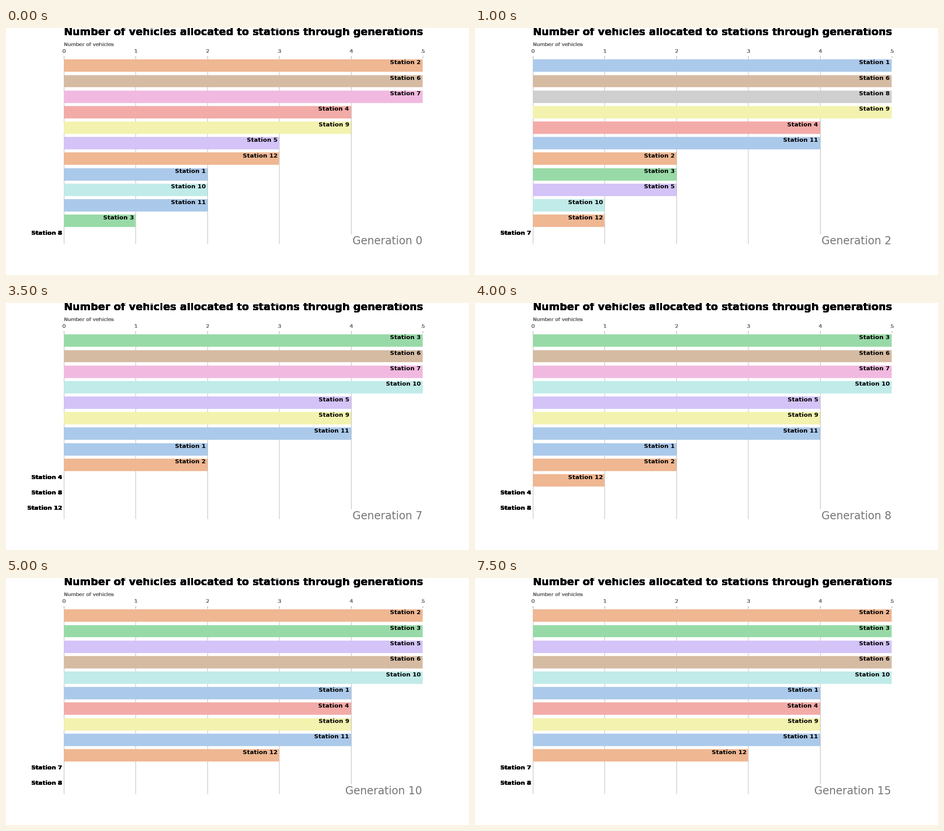
These frames come from a looping animation (1025x547 px, 8 s). A matplotlib script:

```python
import matplotlib.pyplot as plt
from matplotlib.animation import FuncAnimation
from matplotlib.patches import Rectangle

W, H, DPI = 1025, 547, 64
# layout units: a 1080 x 576 sheet scaled to the stage
SHEET_W, SHEET_H = 1080, 576
PT = W / SHEET_W * 72 / DPI

LEFT, UNIT = 0.125 * SHEET_W, 0.155 * SHEET_W
TOP, ROW = 69.73, 36.18
BOTTOM = TOP + 12 * ROW
GREY = "#777777"
HEAVY = 20  # text outside the plot area is overprinted

PASTEL = ["#A1C9F4", "#FFB482", "#8DE5A1", "#FF9F9B", "#D0BBFF",
          "#DEBB9B", "#FAB0E4", "#CFCFCF", "#FFFEA3", "#B9F2F0"]

# generation -> {vehicles: stations that change to that many}
MOVES = {
    0: {5: (2, 6, 7), 4: (4, 9), 3: (5, 12), 2: (1, 10, 11), 1: (3,)},
    1: {5: (1, 9), 4: (11,), 2: (3, 5), 1: (12,), 0: (7, 10)},
    2: {5: (8,), 2: (2,), 1: (10,)},
    7: {5: (3, 7, 10), 4: (5, 9), 2: (1,), 0: (4, 8, 12)},
    8: {1: (12,)},
    9: {5: (2,), 4: (1, 4), 3: (5,), 1: (10,), 0: (7,)},
    10: {5: (5, 10), 3: (12,)},
}


def allocation(gen):
    counts = dict.fromkeys(range(1, 13), 0)
    for step in range(gen + 1):
        for vehicles, stations in MOVES.get(step, {}).items():
            counts.update(dict.fromkeys(stations, vehicles))
    return counts


def muted(color, keep=0.75):
    rgb = [int(color[i:i + 2], 16) / 255 for i in (1, 3, 5)]
    mid = (max(rgb) + min(rgb)) / 2
    return [mid + (c - mid) * keep for c in rgb]


COLORS = [muted(c) for c in PASTEL]

plt.rcParams["font.family"] = "DejaVu Sans"
fig = plt.figure(figsize=(W / DPI, H / DPI), dpi=DPI, facecolor="white")
ax = fig.add_axes([0, 0, 1, 1])
ax.set_xlim(0, SHEET_W)
ax.set_ylim(SHEET_H, 0)
ax.axis("off")


def write(x, y, text, size, times=1, **style):
    return [ax.text(x, y, text, fontsize=size * PT, va="baseline",
                    zorder=5, **style) for _ in range(times)]


def vline(x, y0, y1, color):
    x = round(x) + 0.5
    ax.plot([x, x], [y0, y1], color=color, lw=PT, snap=False,
            solid_capstyle="butt", zorder=1)


def box(x0, y0, x1, y1, color, zorder):
    x0, y0, x1, y1 = map(round, (x0, y0, x1, y1))
    return ax.add_patch(Rectangle((x0, y0), x1 - x0, y1 - y0, lw=0,
                                  facecolor=color, snap=False, zorder=zorder))


write(LEFT, 16.9, "Number of vehicles allocated to stations through generations",
      24.1, HEAVY, weight="bold")
write(LEFT, 42.5, "Number of vehicles", 12, HEAVY, color=GREY)
for k in range(6):
    x = LEFT + k * UNIT
    write(x, 58.3, str(k), 12, HEAVY, color=GREY, ha="center")
    vline(x, TOP - 3.5, TOP, GREY)
    if k < 5:
        vline(x, TOP, BOTTOM, "#b0b0b0")
box(791, 481, 977, 511, "white", 2)

live = []


def clear():
    while live:
        live.pop().remove()
    return []


def draw(gen):
    clear()
    counts = allocation(gen)
    order = sorted(counts, key=lambda s: (-counts[s], s))
    for row, station in enumerate(order):
        end = LEFT + counts[station] * UNIT
        mid = TOP + (row + 0.5) * ROW
        if counts[station]:
            live.append(box(LEFT, mid - 0.4 * ROW, end, mid + 0.4 * ROW,
                            COLORS[(station - 1) % 10], 3))
        live.extend(write(end - UNIT / 40, mid - 3.2, f"Station {station}", 14,
                          1 if counts[station] else HEAVY,
                          weight="bold", ha="right"))
    live.extend(write(971, BOTTOM, f"Generation {gen}", 25,
                      color=GREY, ha="right"))
    return live


anim = FuncAnimation(fig, draw, frames=16, init_func=clear, interval=500,
                     repeat=True, repeat_delay=0, blit=False)
plt.show()
```
